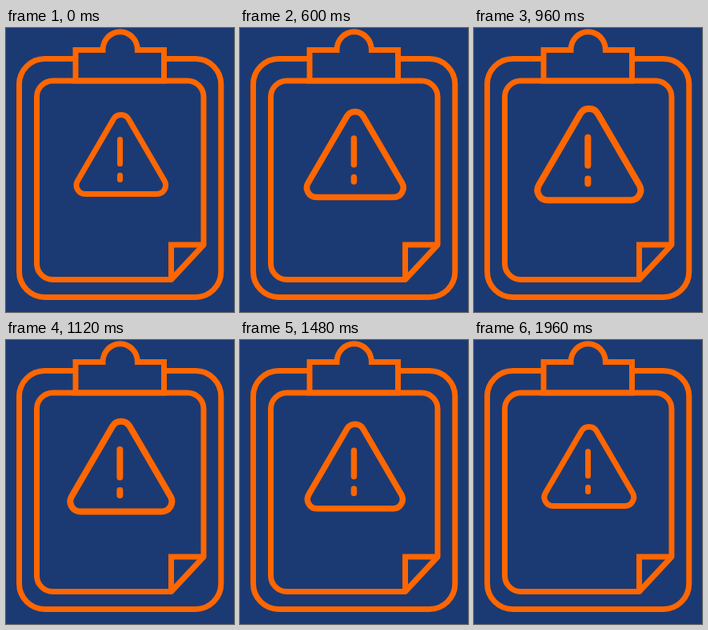
Recreate the animation shown at these times as an HTML page. Size 285x355 px, loop 2000 ms.

```html
<!DOCTYPE html>
<html lang="en">
<head>
<meta charset="utf-8">
<title>Clipboard warning</title>
<style>
  html, body { margin: 0; width: 100%; height: 100%; overflow: hidden; background: #1b3a73; }
  svg { display: block; width: 285px; height: 355px; }
  path { fill: none; stroke: #ff6600; stroke-width: 7; }
  .round { stroke-linejoin: round; }
  .mark { stroke-linecap: round; }
</style>
</head>
<body>
<svg viewBox="0 0 285 355">
  <!-- board -->
  <path d="M87 38.5H48.5A32 32 0 0 0 16.5 70.5V304.5A32 32 0 0 0 48.5 336.5H236.8A32 32 0 0 0 268.8 304.5V70.5A32 32 0 0 0 236.8 38.5H197.5"/>
  <!-- clip -->
  <path d="M87 66V27.5H121A21.7 22.8 0 0 1 164.4 27.5H197.5V66Z"/>
  <!-- paper with folded corner -->
  <path class="round" d="M206.5 314.5H58.5A20 20 0 0 1 38.5 294.5V86A20 20 0 0 1 58.5 66H227A20 20 0 0 1 247 86V271Z"/>
  <path d="M247 271H206.5V314.5"/>
  <g id="warning">
    <path d="M89.5 191L134.3 114A11 11 0 0 1 153.3 114L198.1 191A11 11 0 0 1 188.6 207.5H99A11 11 0 0 1 89.5 191Z"/>
    <path class="mark" d="M142.5 139.5V169.8M142.5 184.3V189.5"/>
  </g>
</svg>
<script>
  const LOOP = 2000, STEP = 40, GROWTH = 0.165;
  const CX = 143.5, CY = 157.5;
  const warning = document.getElementById("warning");
  const start = performance.now();

  function draw(now) {
    const t = Math.floor((Math.max(0, now - start) % LOOP) / STEP) * STEP;
    const rise = t <= STEP ? 0 : 1 - Math.abs(t / (LOOP / 2) - 1);
    const scale = 1 + GROWTH * Math.pow(rise, 1.4);
    warning.setAttribute("transform",
      `translate(${CX} ${CY}) scale(${scale}) translate(${-CX} ${-CY})`);
    requestAnimationFrame(draw);
  }
  draw(start);
</script>
</body>
</html>
```
